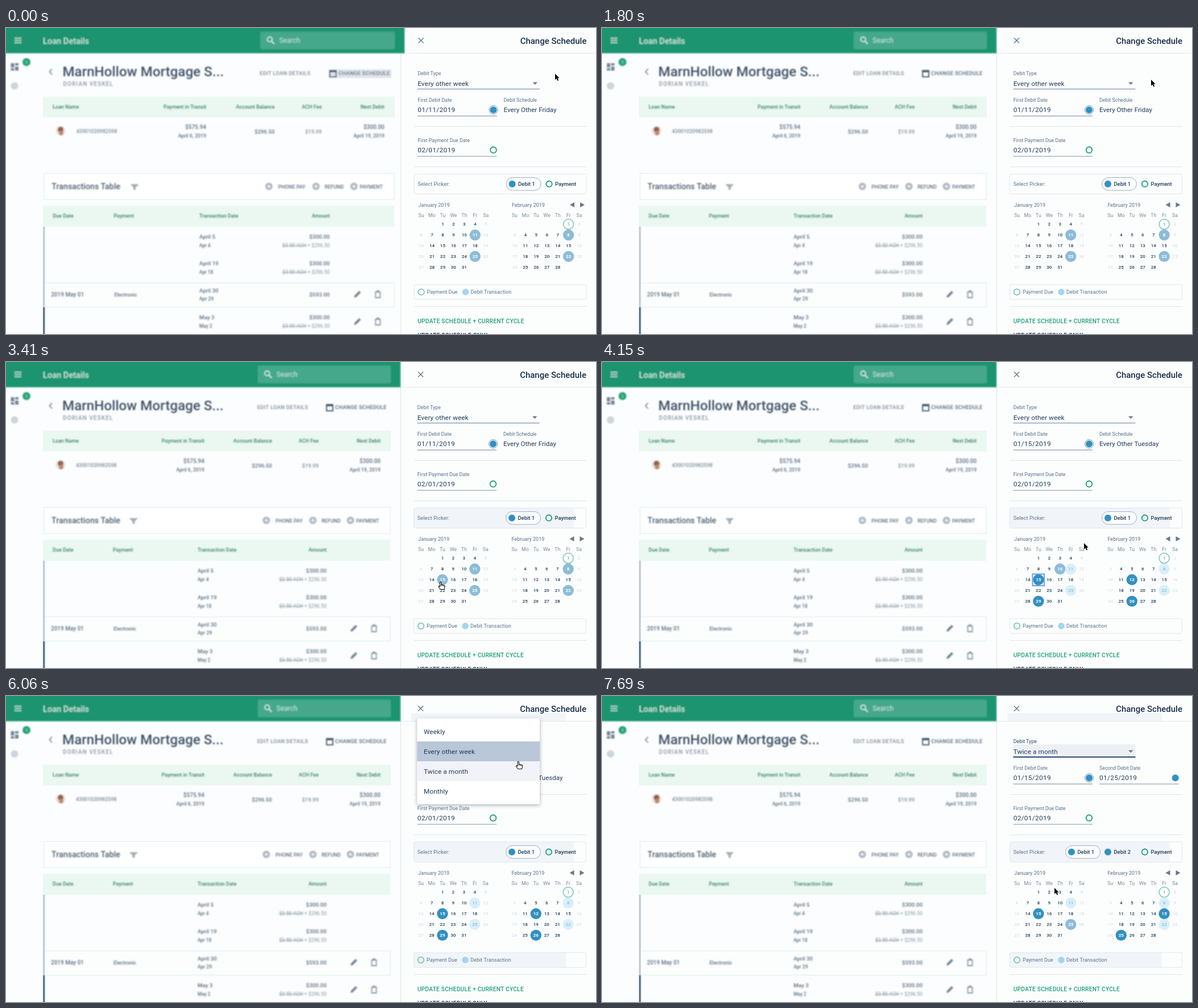
Write an HTML page that moves like this. It is 1038 by 539 pixels and loops after 7.99 s.

```html
<!DOCTYPE html>
<html lang="en">
<head>
<meta charset="utf-8">
<title>Change Schedule</title>
<style>
html, body { margin: 0; width: 100%; height: 100%; overflow: hidden; background: #fbfdfe; }
svg { display: block; width: 1038px; height: 539px; font-family: Roboto, sans-serif; }
</style>
</head>
<body>
<svg id="stage" viewBox="0 0 1038 539" xmlns="http://www.w3.org/2000/svg">
  <defs>
    <filter id="soft" x="-5%" y="-5%" width="110%" height="110%"><feGaussianBlur stdDeviation="1.3"/></filter>
    <filter id="shadow" x="-10%" y="-10%" width="120%" height="125%">
      <feDropShadow dx="0" dy="2" stdDeviation="3" flood-color="#203040" flood-opacity=".4"/>
    </filter>
  </defs>
  <g id="panel"></g>
  <g id="page"></g>
  <g id="top"></g>
</svg>
<script>
const LOOP = 7990;
const INK = '#203c58', LABEL = '#58708a', BLUE = '#3191bf', MID = '#8dbcd8', PALE = '#d9effa', GREEN = '#1f9f77', LINE = '#dfe6ec';
const $ = id => document.getElementById(id);

const text = (x, y, s, size, fill = INK, { w = 400, a = 'start', ls = 0, extra = '' } = {}) =>
  `<text x="${x}" y="${y}" font-size="${size}" fill="${fill}" font-weight="${w}" text-anchor="${a}" letter-spacing="${ls}" ${extra}>${s}</text>`;
const rect = (x, y, x2, y2, fill, extra = '') =>
  `<rect x="${x}" y="${y}" width="${x2 - x}" height="${y2 - y}" fill="${fill}" ${extra}/>`;
const circle = (x, y, r, fill, stroke = 'none', sw = 1) =>
  `<circle cx="${x}" cy="${y}" r="${r}" fill="${fill}" stroke="${stroke}" stroke-width="${sw}"/>`;
const path = (d, fill, stroke = 'none', sw = 1, extra = '') =>
  `<path d="${d}" fill="${fill}" stroke="${stroke}" stroke-width="${sw}" ${extra}/>`;
const rule = (x, x2, y, color, sw = 1) => path(`M${x} ${y}H${x2}`, 'none', color, sw);

// Blurred page behind the panel; `grow` widens its layout.
function page(grow) {
  const X = x => +(x + grow * (x - 65) / 612).toFixed(1);
  const GREY = '#5e7082', HEAD = '#3c8169', MINT = '#eaf8f1';
  const t = (x, y, s, size = 9, fill = GREY, o = {}) => text(X(x), y, s, size, fill, { w: 500, ...o });
  const end = (x, y, s, size, fill, o) => t(x, y, s, size, fill, { a: 'end', ...o });
  const plus = (x, label, lx) => circle(X(x), 279, 6.5, '#aab6c1') +
    path(`M${X(x) - 3.5} 279h7m-3.5 -3.5v7`, 'none', '#fff', 1.3) + t(lx, 282.5, label, 9);
  const tools = y => {
    const p = X(613), b = X(647.5);
    return path(`M${p - 7} ${y + 6}l1 -4l8 -8l3 3l-8 8z`, '#74879a') +
      path(`M${b - 5} ${y - 4}h10M${b - 2} ${y - 6}h4M${b - 4} ${y - 3}v9h8v-9`, 'none', '#8495a6', 1.8);
  };
  const entry = (y, day, debit) => t(337, y, day, 9.8) + t(337, y + 15, debit, 8.3) +
    end(564, y, '$300.00', 9.8) +
    end(564, y + 15, '<tspan text-decoration="line-through">$3.50 ACH</tspan> + $296.50', 8.8, '#8794a1', { w: 400 });
  const right = X(677);
  const sharp = rect(65, 121, right, 157.5, MINT) +
    rect(67, 256, right - 1, 302, '#fff', 'stroke="#d6f1eb"') +
    rect(65, 313, right - 1, 350, MINT) +
    rect(65, 350, 68.5, 492, '#c3ccd9') + rect(65, 492, 68.5, 539, '#60778f') +
    rect(68.5, 449, right - 1, 491.5, '#fcfefe', 'stroke="#d9f2ec"');
  const soft = rect(-9, -9, X(694), 44.5, '#1e9470') +
    rect(15, 17, 27, 18.8, '#b4dfd0') + rect(15, 21, 27, 22.8, '#b4dfd0') + rect(15, 25, 27, 26.8, '#b4dfd0') +
    t(65, 27.5, 'Loan Details', 14.6, '#c6e8dd') +
    rect(X(443), 6.5, right, 37.5, '#45a88a', 'rx="3"') +
    circle(X(459.5), 20, 4.2, 'none', '#d4eee6', 1.8) + path(`M${X(462.5)} 23l5 5`, 'none', '#d4eee6', 2) +
    t(476, 26, 'Search', 12, '#c6e8dd', { w: 400 }) +
    rect(8.5, 62, 14.5, 69.5, '#778899') + rect(16, 62, 22, 66, '#778899') +
    rect(8.5, 71, 14.5, 75, '#778899') + rect(16, 68, 22, 75, '#778899') +
    circle(36, 60, 7, '#27a577') + text(36, 63, '1', 8, '#d8f3e8', { a: 'middle' }) +
    circle(15, 102, 6.5, '#ccd5dd') +
    path('M81 72l-4.5 5l4.5 5', 'none', '#6b7c8d', 1.6) +
    t(99, 85, 'MarnHollow Mortgage S...', 24.2, '#3f5268') +
    t(100, 102, 'DORIAN VESKEL', 10, '#8996a4', { ls: 1.1 }) +
    t(442, 83, 'EDIT LOAN DETAILS', 9.4, '#7b8997', { ls: .3 }) +
    (grow ? rect(X(563), 73, X(671), 88, '#dfe4e9') : '') +
    path(`M${X(564)} 75h11v11h-11zM${X(564)} 77h11`, 'none', '#4b5f74', 2) +
    t(579, 83, 'CHANGE SCHEDULE', 9.4, '#536679', { ls: .3 }) +
    t(82, 142, 'Loan Name', 9, HEAD) + end(349, 142, 'Payment in Transit', 9, HEAD) +
    end(468, 142, 'Account Balance', 9, HEAD) + end(550, 142, 'ACH Fee', 9, HEAD) + end(659, 142, 'Next Debit', 9, HEAD) +
    circle(96, 181, 8.5, '#e6e2d8') + circle(96, 179, 5, '#94604f') + circle(97, 185, 4, '#c58672') +
    t(123, 185, '43001020982598', 9, '#7c8997') +
    end(349, 178, '$575.94', 10) + end(349, 193, 'April 6, 2019', 8.8) +
    end(468, 186, '$296.50', 9.6) + end(550, 186, '$19.99', 9.4, '#82909d') +
    end(659, 178, '$300.00', 10) + end(659, 193, 'April 19, 2019', 8.8) +
    t(80, 284, 'Transactions Table', 14.3, '#4d6072') +
    path(`M${X(217)} 275h15l-5.5 6v4h-4v-4z`, '#a4afba') +
    plus(458, 'PHONE PAY', 474) + plus(540, 'REFUND', 555) + plus(606, 'PAYMENT', 616) +
    t(82, 334, 'Due Date', 9, HEAD) + t(188, 334, 'Payment', 9, HEAD) +
    t(337, 334, 'Transaction Date', 9, HEAD) + end(564, 334, 'Amount', 9, HEAD) +
    entry(371, 'April 5', 'Apr 4') + entry(418, 'April 19', 'Apr 18') +
    t(79, 473, '2019 May 01', 10) + t(189, 473, 'Electronic', 9) +
    t(337, 466, 'April 30', 9.8) + t(337, 480, 'Apr 29', 8.6) + end(564, 473, '$593.00', 9.8) +
    tools(469) + entry(513, 'May 3', 'May 2') + tools(517);
  return `${sharp}<g filter="url(#soft)">${soft}</g>`;
}

function calendar(key, name, x0, firstCol, days, marks) {
  const col = i => x0 + 18.95 * i;
  let out = text(x0 - 5, 314.5, name, 9.1, LABEL);
  ['Su', 'Mo', 'Tu', 'We', 'Th', 'Fr', 'Sa'].forEach((d, i) => out += text(col(i), 333, d, 8.8, '#7b8c9c', { a: 'middle' }));
  for (let d = 1; d <= days; d++) {
    const n = d + firstCol - 1, c = n % 7, x = col(c), y = 345.6 + 18.95 * Math.floor(n / 7);
    const mark = marks[key + d];
    let fill = c % 6 ? INK : '#d9dfe5';
    if (mark === 'due') { out += circle(x, y, 9, '#fbfefd', '#86ccb5', 1.7); fill = '#84a89d'; }
    else if (mark) { out += circle(x, y, 9.7, mark); fill = mark === PALE ? '#86bfe0' : '#fff'; }
    out += text(x, y + 2.8, d, 8, fill, { a: 'middle', w: mark && mark !== 'due' && mark !== PALE ? 700 : 500 });
  }
  return out;
}

const fill = (color, ...keys) => Object.fromEntries(keys.map(k => [k, color]));
const dayMarks = {
  friday: fill(MID, 'J11', 'J25', 'F8', 'F22'),
  tuesday: { ...fill(PALE, 'J11', 'J25', 'F8', 'F22'), ...fill(BLUE, 'J15', 'J29', 'F12', 'F26') },
  twice: { ...fill(PALE, 'J11', 'F8', 'F22'), ...fill(BLUE, 'J15', 'F15', 'F25'), J25: MID }
};

function panel(s) {
  const field = (x, label, date, y) => text(x, y - 18, label, 8.8, LABEL) + text(x, y, date, 11.8, INK, { ls: .35 });
  const dot = (x, label, filled) => circle(x, 274.7, filled ? 6 : 5.2, filled ? BLUE : 'none', filled ? 'none' : GREEN, 1.8) +
    text(x + 10.5, 278.2, label, 9.4, INK, { w: 500 });
  const twice = s.plan === 'twice', pill = twice ? 815.5 : 879.5;
  const marks = { F1: 'due', ...dayMarks[s.plan], ...(s.hover ? { [s.hover]: MID } : {}) };
  const second = twice
    ? field(875, 'Second Debit Date', '01/25/2019', 148) + rule(875, 1015, 155, '#7890a8') + circle(1008.7, 144.2, 6, BLUE)
    : text(875, 130, 'Debit Schedule', 8.8, LABEL) +
      text(875, 148, s.plan === 'friday' ? 'Every Other Friday' : 'Every Other Tuesday', 11.6);
  return rect(694, 0, 1038, 539, '#fcfefe') + path('M694.5 0V539', 'none', '#dce3e7') +
    (s.band ? rect(713, 30, 985, 44, '#f1f5f9') : '') + rule(694, 1038, 44.5, '#e2e8ec') +
    path('M725 17.5l9 9m0 -9l-9 9', 'none', '#587690', 1.3) +
    text(1021, 27.5, 'Change Schedule', 15, '#1b3049', { w: 500, a: 'end' }) +
    text(723.7, 83, 'Debit Type', 8.8, s.line ? '#2c4a6b' : LABEL) +
    (s.focus ? rect(723.5, 85, 938.5, 107, '#edf1f6') : '') +
    text(723.7, 101.5, twice ? 'Twice a month' : 'Every other week', 11.8, INK, { ls: .08 }) +
    path('M926 95.5h8.5l-4.25 4.5z', '#6d7c8a') + rule(723.5, 938.5, 107.5, '#668099') +
    (s.line ? rule(723.5, s.line, 107.5, '#1f3f69', 2) : '') +
    field(723.7, 'First Debit Date', s.plan === 'friday' ? '01/11/2019' : '01/15/2019', 148) +
    rule(723.5, 863, 155, '#6a839b') + circle(857, 144.2, 7.6, '#fff', '#7594ae', 1) + circle(857, 144.2, 6, BLUE) + second +
    rule(718, 1021, 173.5, LINE) +
    field(723.7, 'First Payment Due Date', '02/01/2019', 218.7) + rule(723.5, 863, 226, '#7990a6') +
    circle(857, 214.8, 5.3, 'none', GREEN, 1.8) + rule(718, 1021, 244.5, LINE) +
    (s.tint ? rect(...s.tint, '#f1f5f9') : '') +
    rect(717.5, 257, 1020.5, 292.5, 'none', `rx="3" stroke="${LINE}"`) +
    text(723.7, 278, 'Select Picker:', 9.2, LABEL, { ls: .1 }) +
    rect(pill, 263.5, pill + 61, 286, '#fbfdfe', 'rx="11.2" stroke="#9bb0c2"') +
    dot(pill + 10.5, 'Debit 1', true) + (twice ? dot(890, 'Debit 2', true) : '') + dot(955, 'Payment', false) +
    calendar('J', 'January 2019', 730, 2, 31, marks) + calendar('F', 'February 2019', 894.4, 5, 28, marks) +
    (s.ring ? rect(757.5, 373.5, 778, 394, 'none', 'stroke="#6f9bea" stroke-width="2"') : '') +
    path('M999.5 307v9l-8 -4.5zM1009.5 307v9l8 -4.5z', '#667a8b') +
    (s.legend ? rect(718, 452, 985, 478, '#f1f5f9') : '') +
    rect(717.5, 452, 1020.5, 478, 'none', `rx="3" stroke="${LINE}"`) +
    circle(730, 465, 5.3, 'none', '#67bea0', 1.5) + text(740, 468.2, 'Payment Due', 9, LABEL, { ls: .05 }) +
    circle(808, 465, 5.8, '#a3d6f1') + text(817, 468.2, 'Debit Transaction', 9, LABEL, { ls: .1 }) +
    rule(718, 1021, 490.5, LINE) +
    text(723.7, 519.7, 'UPDATE SCHEDULE + CURRENT CYCLE', 10.2, GREEN, { w: 500, ls: .25 }) +
    text(723.7, 545.2, 'UPDATE SCHEDULE ONLY', 10.2, INK, { w: 500, ls: .25 });
}

function menu(s) {
  if (!s.menu) return '';
  const selected = s.plan === 'twice' && s.menu < 1 ? 2 : 1;
  let out = rect(723.3, 39.5, 939, 190.5, '#fff', 'rx="3" filter="url(#shadow)"');
  ['Weekly', 'Every other week', 'Twice a month', 'Monthly'].forEach((name, i) => {
    const y = 45 + 35 * i;
    if (i === selected) out += rect(723.3, y, 939, y + 35, '#b9c7d9');
    else if (i === s.row) out += rect(723.3, y, 939, y + 35, '#f1f3f8');
    out += text(735, y + 21.5, name, 11.8, INK, { ls: .08 });
  });
  return `<g opacity="${s.menu}">${out}</g>`;
}

function cursor({ x, y, hand }) {
  const shape = hand
    ? path('M-2 7V1Q-2 -.8 -.8 -.8T.4 1V4.5Q2.2 3.6 2.8 5Q4.4 4.3 5 5.7Q6.6 5.4 6.6 7.2Q6.6 10 5.3 12.5H-1.2L-4.4 8.5Q-5 7.2 -3.9 6.7Q-3 6.4 -2 7.7Z', '#fff', '#111', 1.1) +
      path('M.4 4.5V7M2.8 5V7.2M5 5.7V7.5', 'none', '#111', .8)
    : path('M0 0V10.7L2.5 8.4L4.3 12.5L6.2 11.7L4.5 7.7H7.7Z', '#000', '#fff', .8, 'paint-order="stroke"');
  return `<g transform="translate(${x} ${y})">${shape}</g>`;
}

// Each step: start time, cursor tip, and whatever changes; settings carry over.
const early = [827, 257, 970, 282], late = [718, 257, 999, 292];
const steps = [
  [0, 966, 80.5, { plan: 'friday', shift: 7 }],
  [150, 966, 80.5, { shift: 0 }],
  [1800, 966, 91],
  [1950, 965, 131],
  [2100, 960, 176],
  [2400, 829, 266, { tint: early }],
  [2540, 793, 324],
  [2690, 777, 362, { tint: late }],
  [2840, 770, 379, { hand: 1, hover: 'J15' }],
  [2980, 768, 384],
  [3130, 767, 386],
  [3280, 766, 387],
  [3410, 765.5, 388],
  [3560, 765, 387.5],
  [3860, 765, 387.5, { plan: 'tuesday', hover: '', ring: 1 }],
  [4010, 801, 362, { hover: 'J10' }],
  [4150, 848, 319, { hand: 0 }],
  [4300, 877, 264, { hover: '' }],
  [4440, 894, 211],
  [4590, 903, 165],
  [4880, 906, 140],
  [5030, 907, 120, { hand: 0 }],
  [5180, 907, 107],
  [5320, 906, 100],
  [5470, 906, 98],
  [5610, 906, 97.5, { ring: 0, legend: 1, line: 893, menu: .03 }],
  [5760, 906, 99, { line: 938.5, menu: .75, hand: 1, row: 1 }],
  [5910, 905, 104, { menu: 1, band: 1 }],
  [6060, 902, 116, { row: 2 }],
  [6210, 899.5, 126],
  [7100, 899.5, 126, { plan: 'twice' }],
  [7250, 899, 128, { menu: .5, focus: 1 }],
  [7400, 886, 165, { menu: 0, hand: 0 }],
  [7540, 838, 274],
  [7690, 796, 338]
];
let carried = {};
const states = steps.map(([at, x, y, change]) => (carried = { ...carried, ...change, at, x, y }));

const pages = { 7: page(7), 0: page(0) };
const shown = {};
function put(id, html) {
  if (shown[id] !== html) $(id).innerHTML = shown[id] = html;
}
function draw() {
  const t = performance.now() % LOOP;
  const s = states.findLast(state => state.at <= t);
  put('panel', `<g transform="translate(${s.shift ? .5 : 0} 0)">${panel(s)}</g>`);
  put('page', pages[s.shift]);
  put('top', menu(s) + cursor(s));
  requestAnimationFrame(draw);
}
draw();
</script>
</body>
</html>
```
